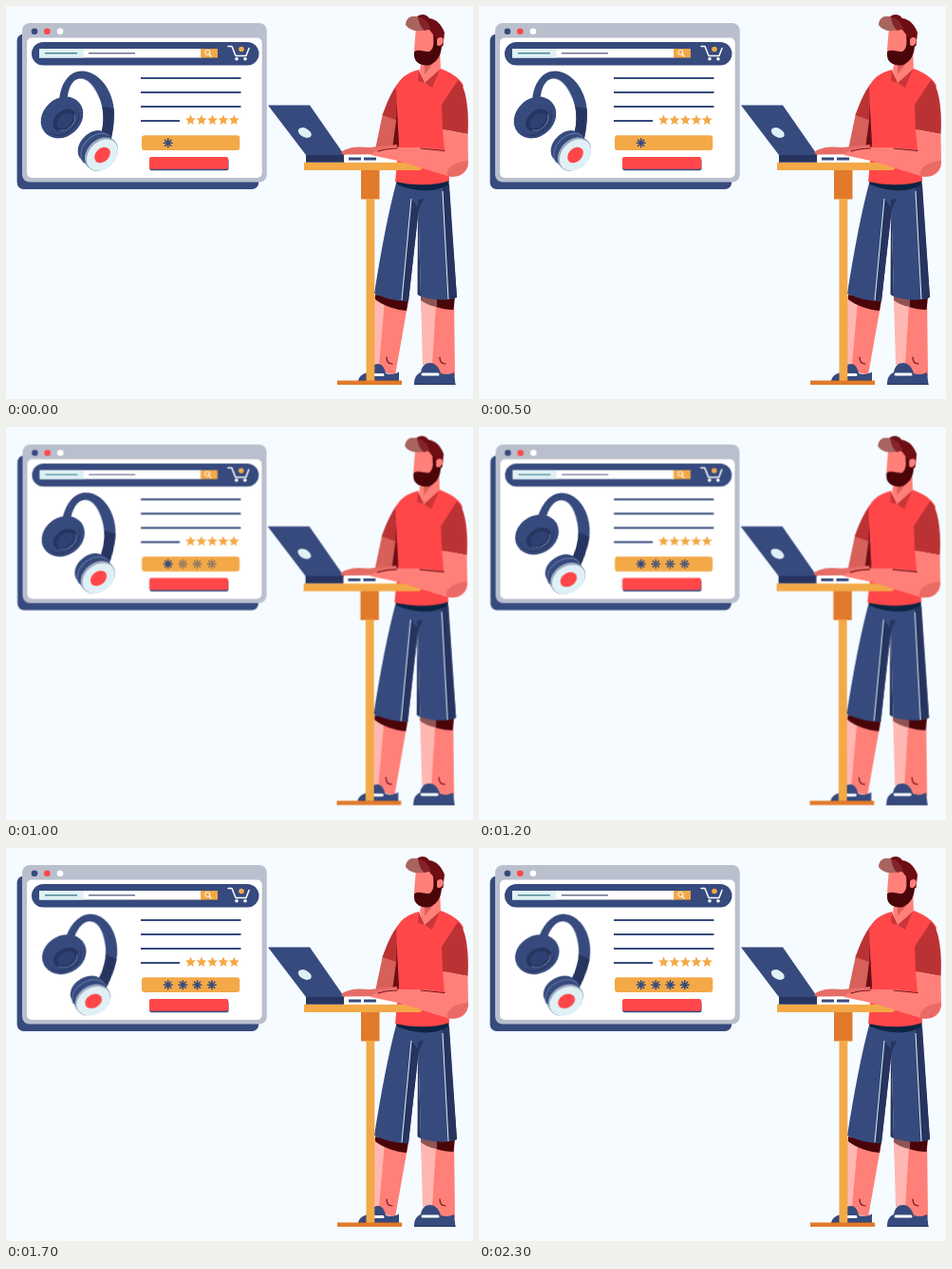
Recreate the animation shown at these times as an HTML page without scripts. Size 492 by 414 pixels, loop 2400 ms.

```html
<!DOCTYPE html>
<html lang="en">
<head>
<meta charset="utf-8">
<title>Online shopping</title>
<style>
html, body { margin: 0; width: 100%; height: 100%; overflow: hidden; background: #f5fbff; }
svg { display: block; width: 492px; height: 414px; }
.navy { fill: #364a7d; }
.dark { fill: #26345f; }
.red { fill: #ff4749; }
.orange { fill: #f3a947; }
.rust { fill: #e27a2b; }
.skin { fill: #ff8078; }
.pale { fill: #ffb7b1; }
.sleeve { fill: #bb3234; }
.maroon { fill: #4a0509; }
.ice { fill: #dff1f6; }
.white { fill: #fff; }
.line { fill: none; stroke: #364a7d; stroke-width: 2; }
.thin { fill: none; stroke: #dff1f6; stroke-width: 1; }
.crease { fill: none; stroke: #751019; stroke-width: 1.2; stroke-linecap: round; }
.scene { transform-origin: 170px 170px; animation: breathe 2400ms step-end infinite; }
.phones { transform-origin: 78px 120px; animation: turn 2400ms infinite; }
.code { animation: reveal 2400ms linear infinite; }
@keyframes breathe {
  0%, 64.5% { transform: none; }
  29% { transform: scale(.997); }
}
@keyframes turn {
  0%, 22.9% { transform: none; animation-timing-function: ease-in-out; }
  62.5%, 100% { transform: translate(1px, -.5px) rotate(15deg); }
}
@keyframes reveal {
  0%, 31% { opacity: 0; }
  54%, 100% { opacity: 1; }
}
</style>
</head>
<body>
<svg viewBox="0 0 492 414">
  <defs>
    <path id="star" d="M0-5.7 1.6-1.9 5.5-1.6 2.5 1 3.4 4.8 0 2.7-3.4 4.8-2.5 1-5.5-1.6-1.6-1.9Z" fill="#f3a947"/>
    <path id="mark" d="M0-5V5M-5 0H5M-3.5-3.5 3.5 3.5M-3.5 3.5 3.5-3.5" fill="none" stroke="#364a7d" stroke-width="1.6"/>
  </defs>

  <g class="scene">
    <!-- browser window -->
    <rect class="navy" x="11.6" y="29.5" width="254.6" height="163.5" rx="7"/>
    <rect x="17" y="18" width="257.8" height="167.5" rx="8" fill="#b9bfcd"/>
    <rect class="white" x="22" y="33.5" width="247.7" height="147.5" rx="5"/>
    <circle class="navy" cx="30" cy="26.7" r="3.3"/>
    <circle class="red" cx="43.3" cy="26.7" r="3.3"/>
    <circle class="white" cx="57" cy="26.7" r="3.3"/>

    <rect class="navy" x="27" y="38" width="239.5" height="24.5" rx="12.2"/>
    <rect class="white" x="35" y="45" width="171" height="9.5"/>
    <rect class="ice" x="35" y="45" width="46.5" height="9.5"/>
    <path d="M41 49.7H75" stroke="#4f8a92" stroke-width="1.4"/>
    <path d="M87 49.7H136" stroke="#6d7590" stroke-width="1.4"/>
    <rect class="orange" x="205" y="45" width="18" height="9.5"/>
    <g fill="none" stroke="#fff" stroke-linecap="round" stroke-linejoin="round">
      <path d="M214 50.8 216 53" stroke-width="1.2"/>
      <circle cx="212.3" cy="48.9" r="2.5" stroke-width="1"/>
      <path d="M234 42.5H238L242 52.5H253L256 44.500" stroke-width="1.5"/>
    </g>
    <circle class="orange" cx="248" cy="45.5" r="2.8"/>
    <circle class="white" cx="243" cy="55.7" r="1.8"/>
    <circle class="white" cx="252" cy="55.7" r="1.8"/>

    <path class="line" d="M142 76H247.5M142 91H247.5M142 106H247.5M142 121H183"/>
    <use href="#star" x="194.5" y="120.2"/>
    <use href="#star" x="206" y="120.2"/>
    <use href="#star" x="217.5" y="120.2"/>
    <use href="#star" x="229" y="120.2"/>
    <use href="#star" x="240.3" y="120.2"/>
    <rect class="orange" x="143" y="136.3" width="103.3" height="15.8" rx="3"/>
    <use href="#mark" x="170.7" y="144.2"/>
    <g class="code">
      <use href="#mark" x="186.3" y="144.2"/>
      <use href="#mark" x="201.5" y="144.2"/>
      <use href="#mark" x="216.8" y="144.2"/>
    </g>
    <rect class="navy" x="151.3" y="161" width="83.2" height="12.2" rx="2"/>
    <rect class="red" x="151" y="159" width="83.2" height="12.8" rx="2"/>

    <!-- headphones -->
    <g class="phones">
      <path class="navy" d="M56 101C57 81 67 68 81 68.500C101 70 114 93 114 113C114 122 113 130 111 139L100 136C104 122 103 108 98 96C92 82 85 75.500 77 76.500C69 78 65 88 64.500 100Z"/>
      <path class="dark" d="M101.500 106 113.600 108C114 120 113 130 111 139L100 136C103 124 103 115 101.500 106Z"/>
      <path d="M77 76.500C85 75.500 92 82 98 96" fill="none" stroke="#7f93b8" stroke-width=".8"/>
      <g transform="translate(59 117.500) rotate(-42)">
        <ellipse class="navy" rx="24" ry="20"/>
        <ellipse cx="-1" cy="3" rx="19" ry="14.500" fill="#2c3c6b"/>
        <ellipse class="navy" cx="-1" cy="1.500" rx="18.500" ry="13.500"/>
        <ellipse class="dark" cx="0" cy="4" rx="14" ry="10"/>
        <path d="M-11 8A12 8.500 0 0 0 12 6" fill="none" stroke="#6a7ea8" stroke-width="1"/>
        <ellipse cx="0" cy="4.500" rx="10" ry="6.500" fill="#2f4072"/>
      </g>
      <g transform="translate(101.500 157) rotate(-45)">
        <path class="navy" d="M-19-13A19 14 0 0 1 19-13L19.500-1A19.500 14.500 0 0 1-19.500-1Z"/>
        <path d="M-19.500-8A19.500 14 0 0 1 19.500-8" fill="none" stroke="#6076a5"/>
        <ellipse cx="0" cy="-2" rx="19.500" ry="14.500" fill="#9eabc1"/>
        <ellipse class="ice" rx="18.800" ry="14"/>
        <ellipse class="red" rx="9.500" ry="7"/>
      </g>
    </g>

    <!-- legs and shoes -->
    <path class="skin" d="M388 306 424 310 410 389 388 383Z"/>
    <path class="pale" d="M388 307 399 311 393 378 387 379Z"/>
    <path class="skin" d="M437 305H472L473 390H441Z"/>
    <path class="pale" d="M437 306H453.500L449 378H439Z"/>
    <path class="maroon" d="M389 304 424 309 422 321C410 320 398 316 389 309Z"/>
    <path class="maroon" d="M453 306H473L471.500 320C465 320 459 319 453 317Z"/>
    <path d="M437 306H454V317C447 316 441 313 437 310Z" fill="#8d5453"/>
    <path class="crease" d="M401 370C401 375 404 377 407 377M457 370C457 375 460 377 463 377"/>
    <path class="navy" d="M371 395C372 389 378 386 384 386C384 380 388 377 392 377C396 377 399 381 400 387C405 389 410 388 414 385.500V395Z"/>
    <path class="navy" d="M430 399C430 392 432 388 437 386C438 379 442 376 447 376C452 376 456 380 458 387C463 389 468 388 472 386L473.500 399Z"/>
    <path d="M371 394.500H414M430 398.500H473.500" stroke="#26345f"/>
    <path d="M386 388.500H397M439 388H455" stroke="#fff" stroke-width="3" stroke-linecap="round"/>

    <!-- shorts -->
    <path class="navy" d="M412 183H466L475 307C463 311 449 310 437 306L434.500 215 424 311C411 311 399 308 388 303C395 258 403 216 412 183Z"/>
    <path class="dark" d="M427 203 435 213 424 311 417 310Z"/>
    <path class="dark" d="M434.500 215 440 203 434 204 433.500 304 437 306Z"/>
    <path class="dark" d="M460 190 467 188 475 307 466 309Z"/>
    <path class="thin" d="M427 203 417 310M460 195 466 309"/>
    <path d="M411 183H466.500V188C455 195 437 198 412 188Z" fill="#0b2442"/>

    <!-- far arm, neck, shirt -->
    <path d="M397 113 412 118 412 151 389 151Z" fill="#d8605a"/>
    <path class="skin" d="M440 49 457 44 458 69 441 86 436 67Z"/>
    <path d="M441 61 455 54 441 72Z" fill="#dd625c"/>
    <path class="sleeve" d="M418 76C408 85 401 102 396.500 115L411 120 416 98Z"/>
    <path d="M412 100 411 121 407 150H415Z" fill="#6b1015"/>
    <path class="red" d="M435 67 441 82 458 66C468 70 478 75 482 84L464 125 467 184C451 190 427 189 410 185L414 145 412 108 411 86C415 76 421 71 435 67Z"/>
    <path class="sleeve" d="M459 104 476 78C485 84 488 112 486.500 135L460 130Z"/>
    <path class="sleeve" d="M435 68 441 81 434 79ZM457 67 441 81 449 86Z" opacity=".8"/>

    <!-- head -->
    <path class="skin" d="M432 22 449 20 459 32 457 45 449 56 433 55 430 46Z"/>
    <path d="M432 12C436 8 443 8 446 13C454 14 459 20 462 28L460.500 42 451 46 450 30 446 25 434 21Z" fill="#6e0d14"/>
    <path d="M421 20C421 12 428 9 434 11.500L446 24C438 27 427 28 421 20Z" fill="#a8645f"/>
    <path d="M434 11.500C440 12 445 17 447 24L441 26C437 23 435 18 434 11.500Z" fill="#85232a"/>
    <path class="maroon" d="M430 48C435 45 440 48 446 48C450 46 451 40 451 32L459 40C459 51 455 58 447 62C439 64 430 60 430 52Z"/>
    <path class="skin" d="M454 35C458 31 462 34 460.500 38C459 42 456 43 454 41Z"/>

    <!-- desk -->
    <path class="rust" d="M374 172H393.500V203.500H374Z"/>
    <path class="orange" d="M379.500 203H388.300V395H379.500Z"/>
    <path class="rust" d="M349 394.500H417V399H349Z"/>
    <path class="orange" d="M314 164.700H446L436 173H314Z"/>

    <!-- laptop -->
    <path class="dark" d="M316 156.500H357V164.700H316Z"/>
    <path class="white" d="M356 157H412V164.700H356Z"/>
    <path d="M361 161H374M377 161H390" stroke="#364a7d" stroke-width="3"/>
    <path class="navy" d="M276 104.500H320L356.500 157H316Z"/>
    <ellipse class="ice" cx="314.800" cy="133.500" rx="7.500" ry="4.600" transform="rotate(28 314.800 133.500)"/>

    <!-- hands and near arm -->
    <path d="M353 154C361 148 372 148 383 149L412 146V156L355 156.500Z" fill="#e66c66"/>
    <path class="skin" d="M460 130 486.500 135 487 166C486 177 476 182 465 179L413 163 384 157C390 151 403 148 416 149L440 149 462 152Z"/>
    <path d="M487 163C487 174 478 182 465 179C463 171 472 164 487 163Z" fill="#ea6a65"/>
    <path class="crease" d="M392 153C398 151 405 150 412 150M437 150 462 152.500"/>
  </g>
</svg>
</body>
</html>
```
